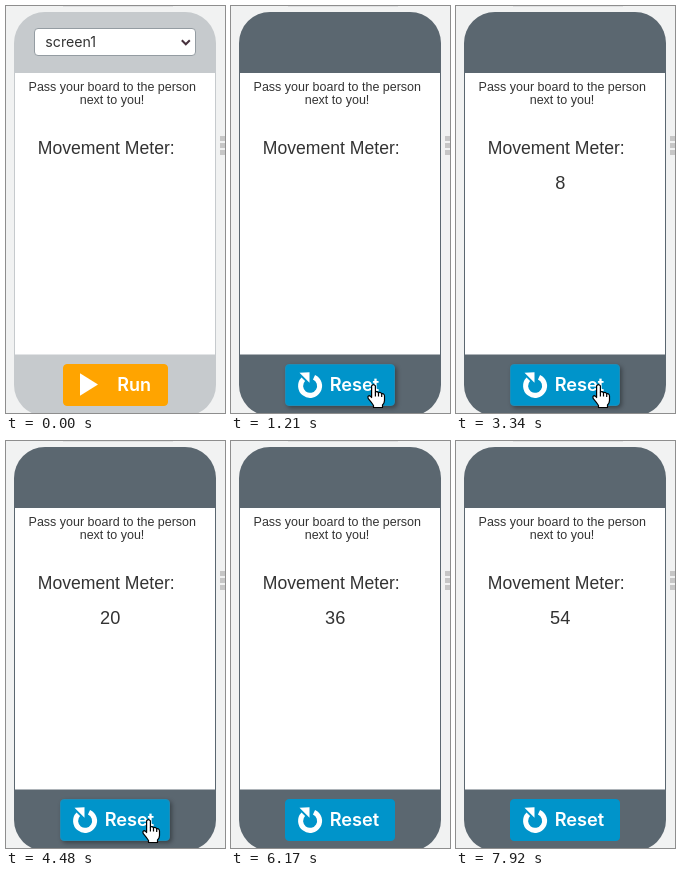
These frames come from a looping animation (219x407 px, 8000 ms). An HTML page:

```html
<!DOCTYPE html>
<html lang="en">
<head>
<meta charset="utf-8">
<title>Movement Meter</title>
<style>
  html, body { margin: 0; width: 100%; height: 100%; overflow: hidden; background: #f1f2f2; }
  svg { display: block; width: 219px; height: 407px; }
  .ui { font-family: Inter, sans-serif; }
  .app { font-family: "Liberation Sans", Arial, sans-serif; fill: #333; }
  .label { font-weight: 600; fill: #fff; }
  #run rect { fill: #ffa400; stroke: #ffa400; }
  #reset rect { fill: #0094ca; stroke: #0094ca; }
  .hover rect { filter: drop-shadow(2px 2px 2px rgba(0, 0, 0, .35)); }
  #run.hover rect { stroke: #93907f; }
  #reset.hover rect { stroke: #1e8db8; }
  #run.pressed rect { stroke: #00f; }
  #cursor path { fill: #fff; stroke: #000; stroke-width: 1.2; stroke-linejoin: round; }
</style>
</head>
<body>
<svg viewBox="0 0 219 407">
  <rect x="57" width="110" height="1" fill="#e0e1e2"/>
  <path d="M214 130h5v5h-5zm0 7h5v5h-5zm0 7h5v5h-5z" fill="#c6c6c6"/>
  <rect id="phone" x="8" y="6" width="202" height="404" rx="31"/>
  <rect x="9" y="67" width="200" height="281.5" fill="#fff"/>

  <g id="picker" class="ui">
    <rect x="28.5" y="22.5" width="161" height="27" rx="3.5" fill="#fff" stroke="#949ca2"/>
    <text x="39.3" y="41.2" font-size="14.2" fill="#333">screen1</text>
    <path d="M175.8 34.3l4 4 4-4" fill="none" stroke="#46303c" stroke-width="2"/>
  </g>

  <g class="app">
    <g font-size="12.5" text-anchor="middle">
      <text x="106.3" y="85">Pass your board to the person</text>
      <text x="106" y="98">next to you!</text>
    </g>
    <text x="31.8" y="148" font-size="17.6">Movement Meter:</text>
    <text id="count" x="104.2" y="183.2" font-size="18.2" text-anchor="middle"></text>
  </g>

  <g id="run" class="ui">
    <rect x="57.5" y="358.5" width="104" height="41" rx="3.5"/>
    <path d="M74 367.3v22.4l18-11.2z" fill="#fff"/>
    <text class="label" x="111.2" y="385" font-size="18">Run</text>
  </g>

  <g id="reset" class="ui">
    <rect x="54.5" y="358.5" width="109" height="41" rx="3.5"/>
    <path d="M83 371.2A9.5 9.5 0 1 1 72.3 373.2" fill="none" stroke="#fff" stroke-width="5"/>
    <path d="M68.5 366.7l10-.5v10.6z" fill="#fff"/>
    <text class="label" x="98.7" y="385.2" font-size="18.2">Reset</text>
  </g>

  <g id="cursor">
    <path id="arrow" d="M0 0V16L4 12.5 6.5 18.5 9 17.5 6.5 11.5H12Z"/>
    <g id="hand">
      <path d="M-1.9 1.4Q0-1.2 1.9 1.4V7.6Q3.6 6.4 5 8.3 7 7.2 8.2 9.3 10.8 8.8 11 11.5V16Q11 18.5 9 20.5V23H0V21Q-2 18-5.2 14.2-6.3 11.4-4.2 11.2-3 11.4-1.9 13Z"/>
      <path d="M1.9 7.5V12M5 8.5V12M8.2 9.5V12.5"/>
    </g>
  </g>
</svg>
<script>
const LOOP = 8000, START = 1210;
const $ = id => document.getElementById(id);
const show = (id, on) => { $(id).style.display = on ? '' : 'none'; };

// [time, value]: the counter runs evenly between these points
const counts = [
  [2540, 0], [3340, 8], [3410, 9], [4210, 17], [4340, 18], [4480, 20], [4610, 21],
  [5090, 26], [5160, 27], [5880, 34], [6020, 35], [6170, 36], [6710, 42],
  [6910, 43], [7650, 51], [7720, 52], [7920, 54]
];

// [time, x, y, shape]: the pointer jumps from place to place
const moves = [
  [0], [390, 159, 398, 'arrow'], [460, 152, 388, 'hand'], [530, 146, 381, 'hand'],
  [610, 142.5, 378.5, 'hand'], [5960, 180.5, 391, 'hand'], [6020, 186, 397, 'arrow'], [6100]
];

function countAt(t) {
  if (t < counts[0][0]) return '';
  const i = counts.findLastIndex(([time]) => time <= t);
  const [t0, v0] = counts[i];
  const [t1, v1] = counts[i + 1] || [t0 + 100, v0];
  return Math.floor(v0 + (v1 - v0) * (t - t0) / (t1 - t0) + 1e-6);
}

function draw(t) {
  const running = t >= START;
  $('phone').setAttribute('fill', running ? '#5b6770' : '#c6cacd');
  show('picker', !running);
  show('run', !running);
  show('reset', running);
  $('run').classList.toggle('pressed', t >= 940 && t < 1140);
  $('count').textContent = countAt(t);

  const [, x, y, shape] = moves.findLast(([time]) => time <= t);
  show('arrow', shape === 'arrow');
  show('hand', shape === 'hand');
  if (shape) $('cursor').setAttribute('transform', `translate(${x} ${y})`);
  for (const id of ['run', 'reset']) $(id).classList.toggle('hover', shape === 'hand');
}

const begin = performance.now();
function tick() {
  draw((performance.now() - begin) % LOOP);
  requestAnimationFrame(tick);
}
tick();
</script>
</body>
</html>
```
